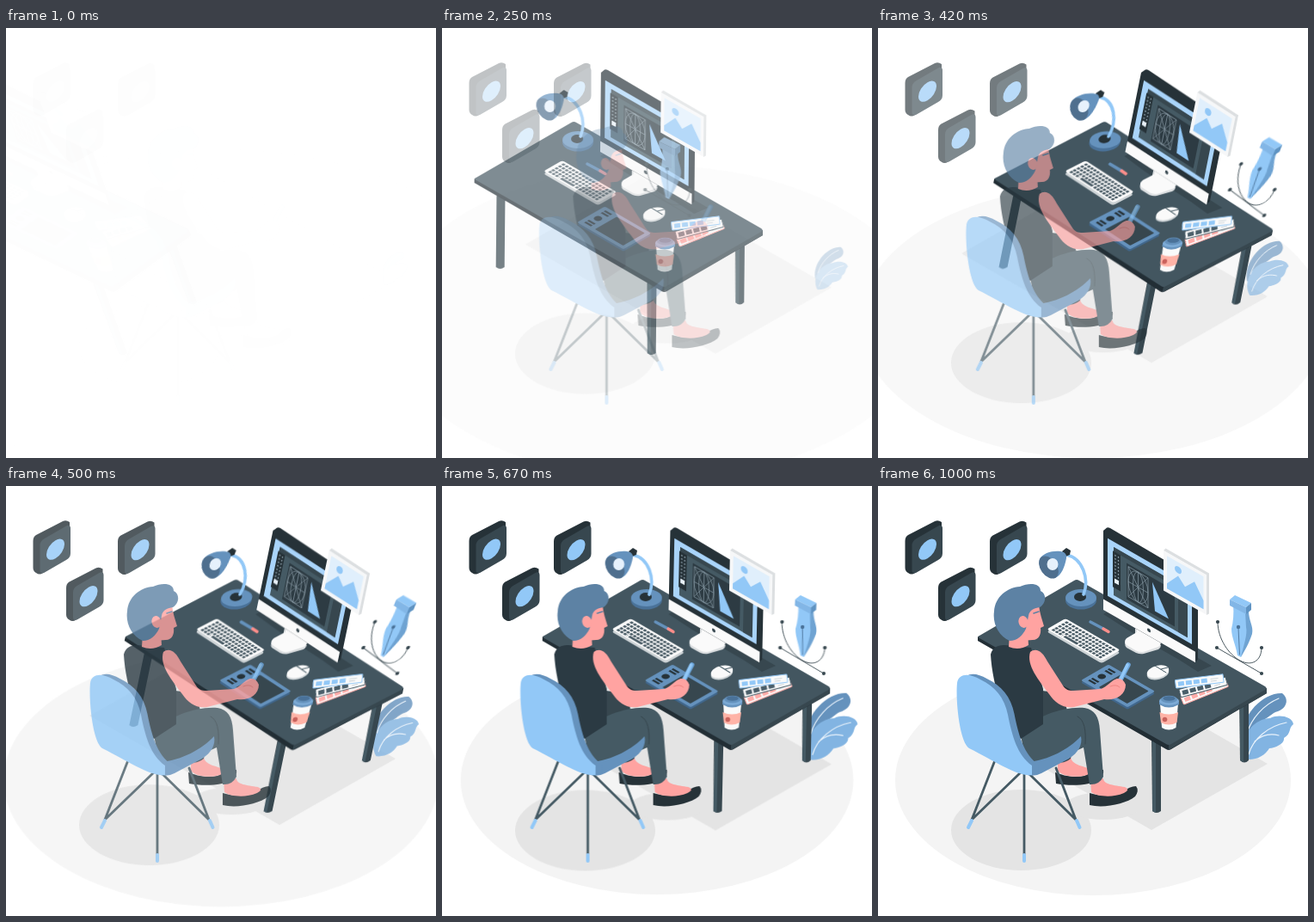
These frames come from a looping animation (500x500 px, 1.04 s). An HTML page:

```html
<!DOCTYPE html>
<html lang="en">
<head>
<meta charset="utf-8">
<title>Designer at a desk</title>
<style>
html, body { margin: 0; width: 100%; height: 100%; overflow: hidden; background: #fff; }
svg { display: block; width: 100vw; height: 100vh; }
.anim { animation: 1s cubic-bezier(.36, -.01, .5, 1.38) both paused; }
.floor { animation-name: shrink; transform-origin: 250px 342px; }
.plant { animation-name: grow; transform-origin: 452px 279px; }
.desk { animation-name: rush; transform-origin: 250px 214px; }
.nib { animation-name: rush; transform-origin: 250px 124px; }
.shade { animation-name: drop; }
.person { animation-name: slide; }
.fade { animation-name: fade; }
@keyframes shrink { from { opacity: 0; transform: scale(1.5); } to { opacity: 1; transform: scale(1); } }
@keyframes grow { from { opacity: 0; transform: scale(.5); } to { opacity: 1; transform: scale(1); } }
@keyframes drop { from { opacity: 0; transform: translateY(-30px); } to { opacity: 1; transform: translateY(0); } }
@keyframes slide { from { opacity: 0; transform: translateX(30px); } to { opacity: 1; transform: translateX(0); } }
@keyframes fade { from { opacity: 0; } to { opacity: 1; } }
@keyframes rush {
  from { opacity: 0; transform: translateX(-250px) skewX(20deg); }
  60% { opacity: 1; transform: translateX(0) skewX(-10deg); }
  80% { opacity: 1; transform: translateX(0) skewX(2deg); }
  to { opacity: 1; transform: translateX(0) skewX(0deg); }
}
.sky { fill: #92c8f7; } .blue { fill: #6592bd; } .navy { fill: #263238; }
.slate { fill: #37474f; } .steel { fill: #455a64; } .skin { fill: #ffa3a1; }
.white { fill: #fafafa; } .grey { fill: #dcdfe1; } .cast { fill: #e4e4e4; }
.line { fill: none; stroke-linecap: round; stroke-linejoin: round; }
</style>
</head>
<body>
<svg viewBox="0 0 500 500">
  <defs>
    <g id="tile">
      <path class="navy" d="M31.500 64 Q31.500 59 35 57 L66 41 Q70 39 74 42 L74 80 L43 101 Q39 104 35 101 Q31.500 99 31.500 95Z"/>
      <g transform="matrix(1 -.57 0 1 39.500 64)">
        <rect class="slate" width="35.500" height="39.500" rx="5"/>
        <circle class="sky" cx="18" cy="20" r="10.500"/>
      </g>
    </g>
    <g id="swatch">
      <rect class="white" x="-54" width="56" height="9.500" rx="1"/>
      <path d="M-51 5 H-16" fill="none" stroke-width="5" stroke-dasharray="7 2"/>
      <path d="M-13 4 H-4 M-13 6.500 H-6" fill="none" stroke="#cfd6da" stroke-width="1"/>
    </g>
    <path id="shell" d="M92 229 C94 217 107 218 119 225 C136 233 147 246 151 266 C156 291 162 313 179 325 L179 336 C162 338 138 321 106 305 C95 298 90 250 92 229Z"/>
  </defs>

  <ellipse class="anim floor" cx="250" cy="342" rx="230" ry="134" fill="#f4f4f4"/>
  <g class="anim shade cast">
    <path d="M318 400 L453 323 L232 196 L97 273Z"/>
    <ellipse cx="166.500" cy="400" rx="81.500" ry="47"/>
    <ellipse cx="262" cy="372" rx="44" ry="16"/>
  </g>

  <g class="anim plant">
    <path class="blue" d="M424 298 C419 270 446 240 470 241 C478 247 476 258 465 262 C458 264 456 268 450 271 C442 276 436 288 430 298Z"/>
    <path d="M428 318 C417 300 432 271 456 270 C466 265 482 268 483 277 C477 281 481 288 472 293 C473 300 462 304 455 305 C450 313 441 319 428 318Z" fill="#82b4e2"/>
    <path class="line" d="M429 288 C434 270 449 254 466 247 M431 312 C436 294 454 279 475 275 M438 297 C448 288 458 288 466 290" stroke="#e9f3fc" stroke-width="1.200"/>
  </g>

  <g class="anim desk">
    <!-- table -->
    <path class="slate" d="M142 180 H152 V278 Q147 282 142 278Z"/>
    <path class="slate" d="M420 245 H431 V319 Q426 324 421 319Z"/>
    <path class="steel" d="M421 246 H425 V321 L421 319Z"/>
    <path class="slate" d="M318 290 H329 V378 Q324 382 319 378Z"/>
    <path class="steel" d="M319 290 H323 V380 L319 378Z"/>
    <path d="M116 175 V180 L335 306 Q338 308 341 306 L452 241 V235 L338 290Z" fill="#222e35"/>
    <path class="slate" d="M338 300 V307 L452 241 V235Z"/>
    <path d="M118 174 L228 110 Q231 108 234 110 L450 233 Q453 235 450 237 L341 300 Q338 302 335 300 L118 177 Q115 175 118 174Z" fill="#435660"/>
    <path class="slate" d="M262 149 L272 143 L388 209 L372 216 L350 202 L322 186 L290 167Z"/>

    <!-- lamp -->
    <ellipse cx="236" cy="133" rx="18" ry="10.500" fill="#4a7299"/>
    <ellipse class="blue" cx="236" cy="130" rx="18" ry="10"/>
    <ellipse class="navy" cx="235" cy="129" rx="7" ry="5"/>
    <path class="line" d="M239 126 C246 108 238 84 219 80" stroke="#92c8f7" stroke-width="3.600"/>
    <path class="navy" d="M214 76 L219 72 L224 75 L223 80 L218 82Z"/>
    <path class="blue" d="M188 85 C192 77 207 74 216 77 Q220 80 219 84 C217 95 213 104 206 107 C195 106 185 97 188 85Z"/>
    <ellipse cx="198.500" cy="94.500" rx="9.500" ry="14.500" fill="#4f6f8e" transform="rotate(-35 198.500 94.500)"/>
    <ellipse cx="203" cy="91" rx="6.500" ry="7" fill="#e6f1fc"/>

    <!-- screen -->
    <path class="grey" d="M299 160 L328 176 V186 L299 172Z"/>
    <path class="grey" d="M287 182 L329 185 Q329 188 326 190 L309 195 Q305 196 300 194 L289 188 Q287 186 287 182Z"/>
    <path class="white" d="M289 177 L301 170 V163 L326 176 L329 182 Q329 185 326 187 L310 192.500 Q305 194 300 191.500 L289 185 Q285 181 289 177Z"/>
    <path class="navy" d="M262 52 L266 48.500 Q268 48 270 49 L372 109 V202 L369 204Z"/>
    <g transform="matrix(1 .573 0 1 262 51)">
      <rect width="107" height="93" rx="2" class="navy"/>
      <path class="white" d="M0 80.500 H107 V93 H0Z"/>
      <circle class="slate" cx="53" cy="86.500" r="2"/>
      <path d="M5 7 H103 V74 H5Z" fill="#a9d4fa"/>
      <path class="steel" d="M12 13 H98 V69 H12Z"/>
      <path class="slate" d="M12 13 H98 V18 H12Z M87 20 H98 V69 H87Z"/>
      <rect class="navy" x="11" y="18" width="9" height="42"/>
      <path d="M14 21 V50 M17.500 21 V50" fill="none" stroke="#9fb2bd" stroke-width="1.300" stroke-dasharray="1.500 2.500"/>
      <rect x="13" y="49" width="5" height="5" fill="#e8f1f8"/>
      <path d="M27 23 H83 V65 H27Z" fill="#2d3b43"/>
      <g fill="none" stroke="#8496a1" stroke-width=".65">
        <path d="M29 26 H52 V61 H29Z L52 61 M52 26 L29 61 M40.500 26 V61 M29 43.500 H52"/>
        <ellipse cx="40.500" cy="43.500" rx="11.500" ry="17.500"/>
        <ellipse cx="40.500" cy="43.500" rx="6" ry="17.500"/>
      </g>
      <path class="sky" d="M57 28 L76 60 H60Z"/>
    </g>

    <!-- picture -->
    <path class="grey" d="M332 75 L334.500 72.500 L385 101.500 V148.500 L382 150 V104Z"/>
    <g transform="matrix(1 .565 0 1 332 75)">
      <rect width="50" height="46.500" fill="#f6f7f8"/>
      <rect x="4" y="4" width="42.500" height="38" fill="#e0effc"/>
      <circle class="sky" cx="17" cy="13" r="4"/>
      <path class="sky" d="M4 36 L17 20 L25 28 L36 16 L46.500 32 V42 H4Z"/>
    </g>

    <!-- keyboard -->
    <g transform="matrix(.866 .5 -.866 .5 218 157)"><rect width="73.500" height="25" rx="3" fill="#cdd3d6"/></g>
    <g transform="matrix(.866 .5 -.866 .5 218 154)">
      <rect class="white" width="73.500" height="25" rx="3"/>
      <path d="M4 4 H70 M4 8.500 H70 M4 13 H70 M4 17.500 H70 M4 21.500 H18 M40 21.500 H70" fill="none" stroke="#4a5c66" stroke-width="3" stroke-dasharray="3.200 1.300"/>
      <path d="M20 21.500 H38" stroke="#4a5c66" stroke-width="3"/>
    </g>
    <path class="line" d="M247 158 L262 166" stroke="#6592bd" stroke-width="3.400"/>
    <path class="line" d="M262 166 L268 169.500" stroke="#ff8f8b" stroke-width="3.400"/>

    <!-- tablet -->
    <g transform="matrix(.866 .5 -.866 .5 268 210)"><rect width="62.500" height="37" rx="2" fill="#41678c"/></g>
    <g transform="matrix(.866 .5 -.866 .5 268 207.500)">
      <rect class="blue" width="62.500" height="37" rx="2"/>
      <rect class="slate" x="20" y="4" width="38" height="29" rx="1"/>
      <g class="navy">
        <circle cx="9.500" cy="18.500" r="4"/>
        <path d="M5 4 H14 V6.500 H5Z M5 8 H14 V10.500 H5Z M5 26 H14 V28.500 H5Z M5 30 H14 V32.500 H5Z"/>
      </g>
    </g>

    <!-- mouse and swatches -->
    <ellipse cx="325.500" cy="218" rx="13" ry="7" fill="#cdd3d6" transform="rotate(-14 325 218)"/>
    <ellipse class="white" cx="325.500" cy="216" rx="13" ry="7" transform="rotate(-14 325 216)"/>
    <path class="line" d="M322 209 L335 217 M329 213 L337 211" stroke="#455a64" stroke-width="1"/>
    <use href="#swatch" stroke="#ffaca8" transform="translate(402 225) rotate(-22)"/>
    <use href="#swatch" stroke="#4a5e69" transform="translate(402 222.500) rotate(-15)"/>
    <use href="#swatch" stroke="#92c8f7" transform="translate(399 219) rotate(-7)"/>

    <!-- cup -->
    <path class="white" d="M328 253 H349 L346.500 281 Q338 286 330 281Z"/>
    <path d="M327.500 263 Q338 268 349 263 L347.500 275 Q338 280 329 275Z" fill="#ffb3a7"/>
    <circle cx="333.500" cy="271.500" r="2.800" fill="#c9615c"/>
    <path class="blue" d="M327 250 V254 Q338 261 350 254 V250Z"/>
    <ellipse cx="338.500" cy="250" rx="11.500" ry="5" fill="#7dabd6"/>
    <ellipse class="blue" cx="338.500" cy="248" rx="9.500" ry="4.300"/>
    <ellipse cx="338.500" cy="247" rx="7" ry="2.800" fill="#4a7299"/>

    <!-- vector pen -->
    <g class="anim nib">
      <path class="line" d="M395 158 C395 178 408 196 421 203 C434 210 446 204 446 188 M394 188 L446 218" stroke="#37474f" stroke-width=".9"/>
      <path class="sky" d="M413 138 L430 147 C431 158 435 164 434 172 C431 182 426 190 422 199 L418 197 C416 185 411 176 411 166 C413 158 414 148 413 138Z"/>
      <path d="M427 146 L431 145 C431 157 437 163 435 172 C431 184 427 190 422 199 C425 186 430 172 428 164Z" fill="#6fa3d2"/>
      <path class="sky" d="M409 132 L415 127 L434 136 L428 141Z"/>
      <path d="M409 132 L428 141 V149 L409 139Z" fill="#82b6e6"/>
      <path d="M428 141 L434 136 V144 L428 149Z" fill="#5f93c2"/>
      <path class="line" d="M419 165 L420.500 196" stroke="#4a7299" stroke-width=".9"/>
      <circle cx="419" cy="164" r="2.200" fill="#4a7299"/>
      <g class="slate">
        <circle cx="395" cy="158" r="2.100"/><circle cx="394" cy="188" r="2.100"/>
        <circle cx="446" cy="188" r="2.100"/><circle cx="446" cy="218" r="2.100"/>
      </g>
    </g>
  </g>

  <g class="anim person">
    <!-- far leg -->
    <path class="slate" d="M188 238 C205 238 218 246 220 262 L190 280Z"/>
    <path class="navy" d="M206 333 L207 346 C222 349 246 349 258 341 Q263 336 262 330 Q252 329 240 337 C226 340 214 336 206 333Z"/>
    <path class="skin" d="M209 317 L224 314 C224 323 235 325 244 328 Q250 331 243 336 C228 340 214 337 209 331Z"/>
    <path class="slate" d="M194 290 L230 285 L224 317 Q215 324 208 320Z"/>
    <!-- near leg -->
    <path class="navy" d="M246 357 L246 371 C262 375 288 370 299 361 Q304 354 300 349 Q293 349 284 356 C270 362 255 360 246 357Z"/>
    <path class="skin" d="M247 342 L262 340 C262 347 274 348 287 350 Q294 353 286 357 C272 363 255 361 248 356Z"/>
    <path class="steel" d="M165 284 C185 268 215 256 240 258 C252 260 257 268 258 284 L262 338 Q257 348 246 347 L239 304 L190 326 L172 322Z"/>
    <path class="line" d="M232 268 C240 272 242 284 241 300" stroke="#37474f" stroke-width="1"/>

    <!-- body -->
    <path d="M131 196 C133 186 143 183 154 186 L178 188 L186 215 L192 236 V277 L166 294 C148 278 133 232 131 196Z" fill="#2b3a43"/>
    <path class="skin" d="M153 170 L174 170 L175 185 Q164 192 152 187Z"/>
    <path class="skin" d="M164 146 L187 138 C188 148 191 156 193 163 L189 165 C190 172 187 179 180 179 L166 180Z"/>
    <path d="M153 180 C140 174 133 160 135 146 C136 129 150 118 165 117 C176 112 189 113 189 122 C197 126 195 137 188 141 C182 142 176 144 175 151 L172 166 C168 174 162 180 153 180Z" fill="#5d82a4"/>
    <ellipse class="skin" cx="169" cy="158" rx="5.500" ry="7" transform="rotate(-15 169 158)"/>
    <path class="line" d="M181 148 L187 146" stroke="#5d82a4" stroke-width="1.500"/>
    <path class="line" d="M281 227 L291 208" stroke="#6ea7dc" stroke-width="5.500"/>
    <path class="line" d="M281 227 L290 208" stroke="#92c8f7" stroke-width="3.500"/>
    <path class="skin" d="M177 193 C184 187 192 193 197 204 L215 232 C218 237 222 238 227 238 L259 236 C267 233 271 226 278 224 Q285 223 288 231 C288 243 276 250 263 248 L228 257 C215 259 206 252 199 242 C187 226 172 208 177 193Z"/>
    <path class="line" d="M270 233 Q277 230 281 234" stroke="#ef8582" stroke-width="1"/>

    <!-- chair -->
    <g class="line" stroke="#455a64" stroke-width="2.800">
      <path d="M136 319 L109 388 L166 333 M170 334 V428 M174 333 L230 388 L207 328"/>
    </g>
    <g class="line" stroke="#92c8f7" stroke-width="4">
      <path d="M109 389 L105 397 M170 429 V436 M231 389 L234.500 397"/>
    </g>
    <path class="blue" d="M174 321 C198 319 222 306 236 291 C238 301 233 310 222 317 L190 334 Q181 339 170 335Z"/>
    <use href="#shell" class="blue" x="7.500" y="-1"/>
    <use href="#shell" class="sky"/>
  </g>

  <g class="anim fade">
    <use href="#tile"/>
    <use href="#tile" x="98.500" y=".5"/>
    <use href="#tile" x="38.500" y="54.500"/>
  </g>
</svg>
<script>
const LOOP = 1040, FPS = 24, LEAD = 32, OPENING = 40;
const parts = document.getAnimations();
const start = performance.now();

function draw() {
  const t = (performance.now() - start) % LOOP;
  const step = Math.floor((t + 5) * FPS / 1000);
  // the opening pose is held for two steps
  const time = step < 2 ? OPENING : step * 1000 / FPS + LEAD;
  for (const part of parts) part.currentTime = Math.min(time, 1000);
  requestAnimationFrame(draw);
}
draw();
</script>
</body>
</html>
```
